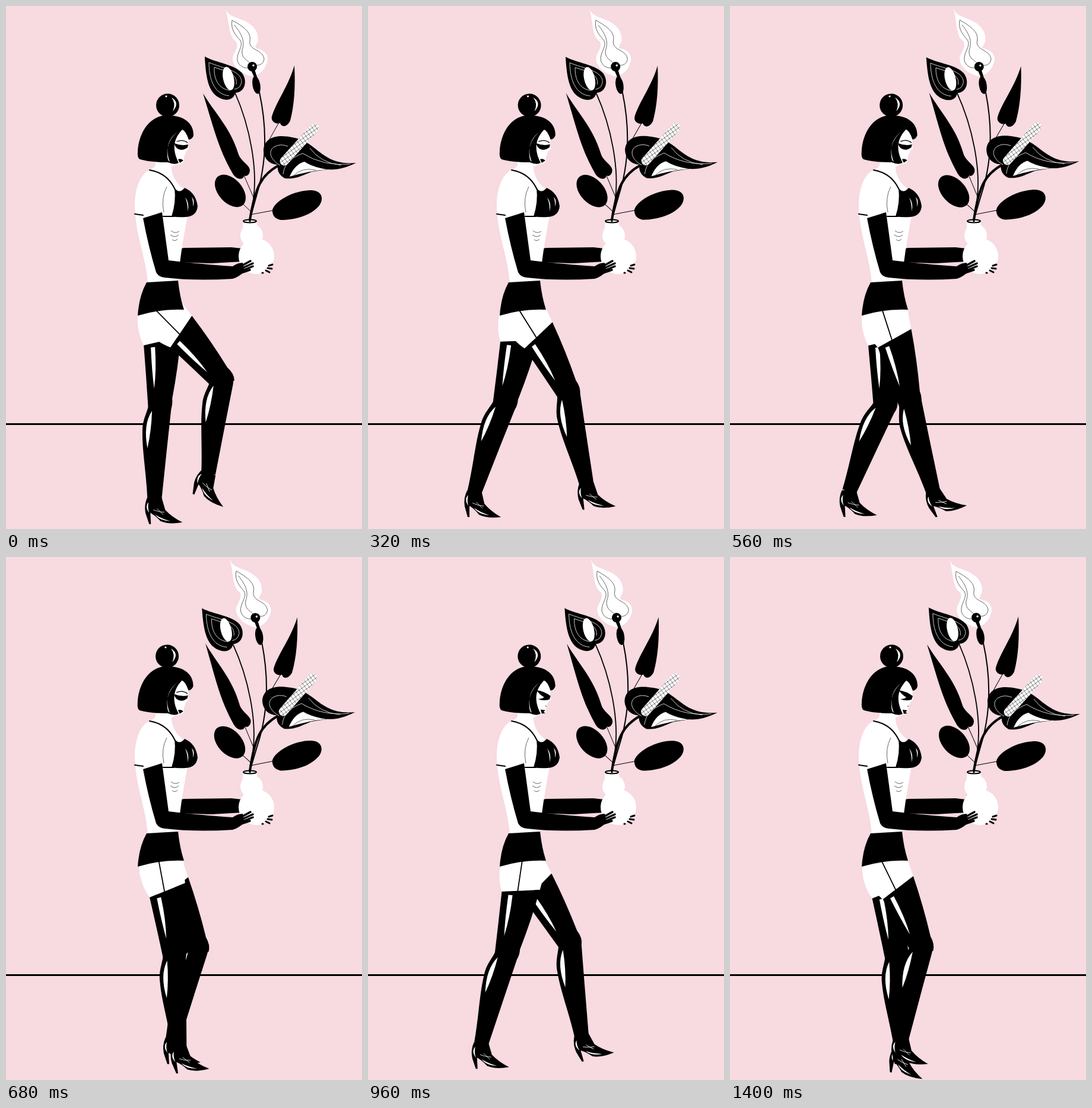
Recreate the animation shown at these times as an HTML page. Size 600 by 880 pixels, loop 1440 ms.

```html
<!DOCTYPE html>
<html lang="en">
<meta charset="utf-8">
<title>Walking with flowers</title>
<style>
  html, body { margin: 0; width: 100%; height: 100%; overflow: hidden; background: #f8dae1; }
  svg { display: block; width: 100vw; height: 100vh; }
  .w { fill: #fff; }
  .line { fill: none; stroke: #000; stroke-linecap: round; }
  .vein { fill: none; stroke: #fff; stroke-width: .8; }
  .fine { fill: none; stroke: #555; stroke-width: .9; }
  .spadix { fill: none; stroke-width: 15; stroke-linecap: round; }
</style>
<svg viewBox="0 0 600 880">
  <defs>
    <pattern id="net" width="8" height="8" patternUnits="userSpaceOnUse" patternTransform="rotate(10)">
      <path d="M0 0L8 8M8 0L0 8" stroke="#333" stroke-width=".7"/>
    </pattern>
    <g id="thigh">
      <path class="w" d="M-42-5Q-46 25-31 52L31 35 33-5Z"/>
      <path d="M-31 52L31 35Q28 88 20 140Q22 155 15 164L-17 162L-20 156Q-25 105-31 52Z"/>
      <path class="w" d="M-19 55L-12 54Q-8 92-11 124Q-16 94-19 55Z"/>
    </g>
    <g id="shin">
      <path d="M-19 0C-20 14-29 28-27 48C-26 78-16 120-12 160H12L16 70 19 8Q21-16 0-18Q-16-16-19 0Z"/>
      <path class="w" d="M-13 12Q-27 36-17 75Q-12 45-13 12Z"/>
    </g>
    <g id="shoe">
      <path d="M-12-3Q-18 10-15 24L-9 42H-6L-7 23Q2 28 10 37Q24 43 47 39Q29 30 18 18L12-3Z"/>
      <path class="w" d="M-10 5Q-17 12-9 23Q-12 14-10 5ZM1 26Q8 36 27 37Q12 33 1 26Z"/>
      <path class="vein" d="M-2 18Q8 22 17 22M4 16L15 26"/>
    </g>
  </defs>

  <path class="line" stroke-width="3" d="M-5 703.500H605"/>

  <g id="far"><use href="#thigh"/><g><use href="#shin"/><g><use href="#shoe"/></g></g></g>
  <g id="near"><use href="#thigh"/><path class="line" stroke-width="1.8" d="M-9-11L-5 45"/>
    <g><use href="#shin"/><g><use href="#shoe"/></g></g></g>

  <!-- far arm, torso -->
  <path d="M290 409L300 407 380 406 398 408V430L345 433 290 431Z"/>
  <path class="w" d="M252 255V268Q250 273 238 278C218 292 215 330 218 352C221 390 236 425 239 466L290 463Q293 420 306 353L300 308Q284 297 280 280L276 255Z"/>
  <path d="M237 465L290 462Q293 490 300 511Q262 509 222 521Q224 488 237 465Z"/>
  <path d="M284 306Q292 317 301 306Q320 314 323 337Q321 354 303 355Q290 356 279 354Q287 330 284 306Z"/>
  <path class="w" d="M302 322Q310 332 306 346Q307 334 302 322ZM313 321Q319 328 315 338Q316 330 313 321Z"/>
  <path class="line" stroke-width="2" d="M242 276Q272 281 285 309M217 350L231 352M265 354H283"/>
  <path class="fine" d="M266 347Q261 323 271 304M278 378q7 6 14 1M277 385q8 6 14 0M280 393q5 4 9-1"/>

  <g id="head">
    <path class="w" d="M280 205H306L308 225 307 235 309 240 304 244 302 249 300 254 300 260Q299 266 288 266L276 272Z"/>
    <g id="closed">
      <path d="M284 231Q296 236 307 233L306 238Q297 245 289 240Q284 236 284 231Z"/>
      <path class="line" stroke-width="1.2" d="M288 228Q298 224 306 230"/>
      <path d="M290 258Q295 256 299 260L293 264Z"/>
    </g>
    <g id="open">
      <path d="M284 224Q298 226 308 234L306 240Q296 243 287 239Q295 239 297 236Q290 232 284 224Z"/>
      <path d="M291 257L299 258 296 261 299 263 293 264Z"/>
      <circle cx="300" cy="251" r=".8"/>
    </g>
    <circle cx="272.500" cy="167" r="19.500"/>
    <path class="w" d="M279 154Q294 163 281 177Q287 164 279 154Z"/>
    <circle class="w" cx="270" cy="152" r="1.600"/>
    <path d="M226 258Q221 256 222 246C223 216 240 185 270 184C300 183 317 198 316 218Q314 224 308 225Q303 210 297 208C280 226 281 244 291 264Q284 268 273 263Q243 263 226 258Z"/>
    <path class="w" d="M290 211C269 226 270 247 276 262Q271 260 272 242Q274 224 290 211Z"/>
  </g>

  <!-- bouquet -->
  <g class="plant" data-sway="1.100">
    <path class="line" stroke-width="1" d="M401 285L418 324"/>
    <path d="M332 147C352 180 378 205 391 247C395 262 410 266 411 276C411 284 405 288 401 285C401 293 388 294 381 280C358 240 350 205 332 147Z"/>
  </g>
  <g class="plant" data-sway="1.100">
    <path class="line" stroke-width="1" d="M460 196L442 228"/>
    <path d="M486 100Q489 155 479 193C473 205 464 204 462 197C455 200 446 194 448 186C456 160 476 135 486 100Z"/>
  </g>
  <g class="plant" data-sway="-1">
    <path class="line" stroke-width="1.800" d="M386 146C412 205 424 275 417 325L411 360"/>
    <path d="M335 85C355 96 385 98 398 113C408 127 402 146 386 146C386 153 378 160 366 157C342 150 337 125 335 85Z"/>
    <path class="vein" d="M342 95C342 125 352 149 376 151M342 95C365 105 397 108 397 128Q395 139 385 140M351 103C350 124 359 140 378 142M351 103C370 110 391 113 388 132"/>
    <ellipse class="w" rx="9" ry="20" transform="translate(375 122)rotate(-13)"/>
  </g>
  <g class="plant" data-sway="1.200">
    <path class="line" stroke-width="2" d="M427 145C439 200 440 250 427 302Q419 330 411 360"/>
    <path class="w" d="M370 5C375 17 385 18 397 23C416 30 425 42 425 56C425 63 419 66 421 71C433 73 441 79 441 90C438 106 428 117 414 118C396 114 382 102 382 88C384 77 393 70 388 60C374 50 377 28 370 5Z"/>
    <path class="fine" d="M381 24C378 40 388 50 395 58C401 68 388 78 390 92C393 102 402 105 408 104M381 24C395 32 414 42 411 58C408 76 434 72 435 90Q433 100 421 100M385 32C398 48 403 60 398 74C396 88 406 90 411 96"/>
    <path d="M413 108L419 107 424 122 420 124Z"/>
    <ellipse rx="6.500" ry="15" transform="translate(422 133)rotate(-10)"/>
    <circle cx="415" cy="102" r="8"/>
    <circle class="w" cx="417" cy="100" r="1.700"/>
  </g>
  <g class="plant" data-sway="-1">
    <path class="line" stroke-width="4" d="M460 268C430 284 420 305 411 360"/>
    <path d="M434 242C436 220 458 216 482 221C525 227 530 269 590 264C573 272 560 276 542 275Q527 277 515 279C499 285 488 292 470 290C459 284 457 276 458 267C445 267 434 257 434 242Z"/>
    <path class="w" d="M478 287Q487 266 503 262Q517 271 541 275Q512 277 478 287Z"/>
    <path class="fine" d="M485 285Q499 271 522 276"/>
    <path class="vein" d="M462 268C447 260 440 245 452 237Q462 231 475 236M467 283C470 262 483 255 500 248Q535 270 580 266M512 239Q530 264 565 268"/>
    <path class="spadix" stroke="#fff" d="M469 261L520 205"/>
    <path class="spadix" stroke="url(#net)" d="M469 261L520 205"/>
  </g>
  <g class="plant" data-sway="-1.200">
    <path class="line" stroke-width="1" d="M397 331L414 347"/>
    <ellipse rx="32" ry="20" transform="translate(378 311)rotate(48)"/>
  </g>
  <g class="plant" data-sway="-.6">
    <path class="line" stroke-width="1" d="M450 344L412 351"/>
    <path d="M449 346C447 334 478 310 515 310C534 311 536 326 527 337C512 354 484 360 463 360C454 358 450 354 449 346Z"/>
  </g>

  <!-- vase, near arm, hands -->
  <path class="w" d="M399 362H423V376H399Z"/>
  <circle class="w" cx="414" cy="386" r="19"/>
  <circle class="w" cx="422" cy="421" r="30"/>
  <ellipse cx="411" cy="362" rx="11" ry="2.500" fill="#fff" stroke="#000" stroke-width="2"/>
  <path class="line" stroke-width="3" d="M411 359V362"/>
  <path d="M231 357L263 347 274 428Q335 435 382 438Q390 432 399 432L402 446Q393 456 382 459Q320 463 268 457Q257 456 253 448Q240 405 231 357Z"/>
  <path class="line" stroke-width="3.500" d="M392 440L412 429M396 442L416 433M396 446L416 438M393 450L411 444"/>
  <path class="line" stroke-width="3" d="M443 437L449 435M441 441L448 442M438 445L444 448M432 449h1"/>
</svg>
<script>
  const LOOP = 1440, STEP = 40, THIGH = 150, SHIN = 160;
  // time, then thigh, shin and shoe angles of the near leg and of the far leg
  const POSES = [
    [0,    40.5, -8.4, 26,   -2, -3.4, 0],
    [320,  28, 11.2, -3,     -13, -19, 3],
    [440,  20, 21.7, -25,    -18, -27, 5],
    [680,  6.5, 3, -5,       22.5, -15, 0],
    [720,  -2, -3.4, 0,      40.5, -8.4, 26],
    [960,  -12.5, -15.9, 0,  30, 7.2, -13],
    [1160, -16, -24.7, 0,    22, 13.6, -21],
    [1400, 22, -12.4, 3,     6, 3, 15]
  ];
  const $ = id => document.getElementById(id);
  const place = (el, x, y, angle) => el.setAttribute('transform', `translate(${x} ${y})rotate(${angle})`);

  function key(i) {
    const n = POSES.length, turn = Math.floor(i / n), row = POSES[i - turn * n];
    return [row[0] + turn * LOOP, ...row.slice(1)];
  }

  // Smooth cyclic curve through the poses
  function poseAt(t) {
    let i = POSES.length - 1;
    while (POSES[i][0] > t) i--;
    const [a, b, c, d] = [i - 1, i, i + 1, i + 2].map(key);
    const span = c[0] - b[0], u = (t - b[0]) / span;
    return b.slice(1).map((from, j) => {
      const k = j + 1, to = c[k];
      const m0 = (to - a[k]) / (c[0] - a[0]) * span;
      const m1 = (d[k] - from) / (d[0] - b[0]) * span;
      const p = u * u * (3 - 2 * u);
      return from + (to - from) * p + u * (1 - u) * (m0 * (1 - u) - m1 * u);
    });
  }

  // The hip lifts a little as the thigh swings forward
  function setLeg(leg, x, y, [thigh, shin, shoe]) {
    const lower = leg.querySelector(':scope > g'), foot = lower.querySelector('g');
    place(leg, x, y - thigh * .08, -thigh);
    place(lower, 0, THIGH, thigh - shin);
    place(foot, 0, SHIN, shin + shoe);
  }

  function draw(now) {
    const t = Math.floor(now % LOOP / STEP) * STEP;
    const pose = poseAt(t), sway = (1 - Math.cos(t / LOOP * 2 * Math.PI)) / 2;
    setLeg($('near'), 267, 518, pose.slice(0, 3));
    setLeg($('far'), 265, 520, pose.slice(3));
    for (const plant of document.querySelectorAll('.plant'))
      plant.setAttribute('transform', `rotate(${plant.dataset.sway * sway} 411 360)`);
    $('head').setAttribute('transform', `rotate(${-.5 * sway} 268 275)`);
    const awake = t >= 800;
    $('open').style.display = awake ? '' : 'none';
    $('closed').style.display = awake ? 'none' : '';
  }

  const start = performance.now();
  (function loop() {
    draw(performance.now() - start);
    requestAnimationFrame(loop);
  })();
</script>
</html>
```
